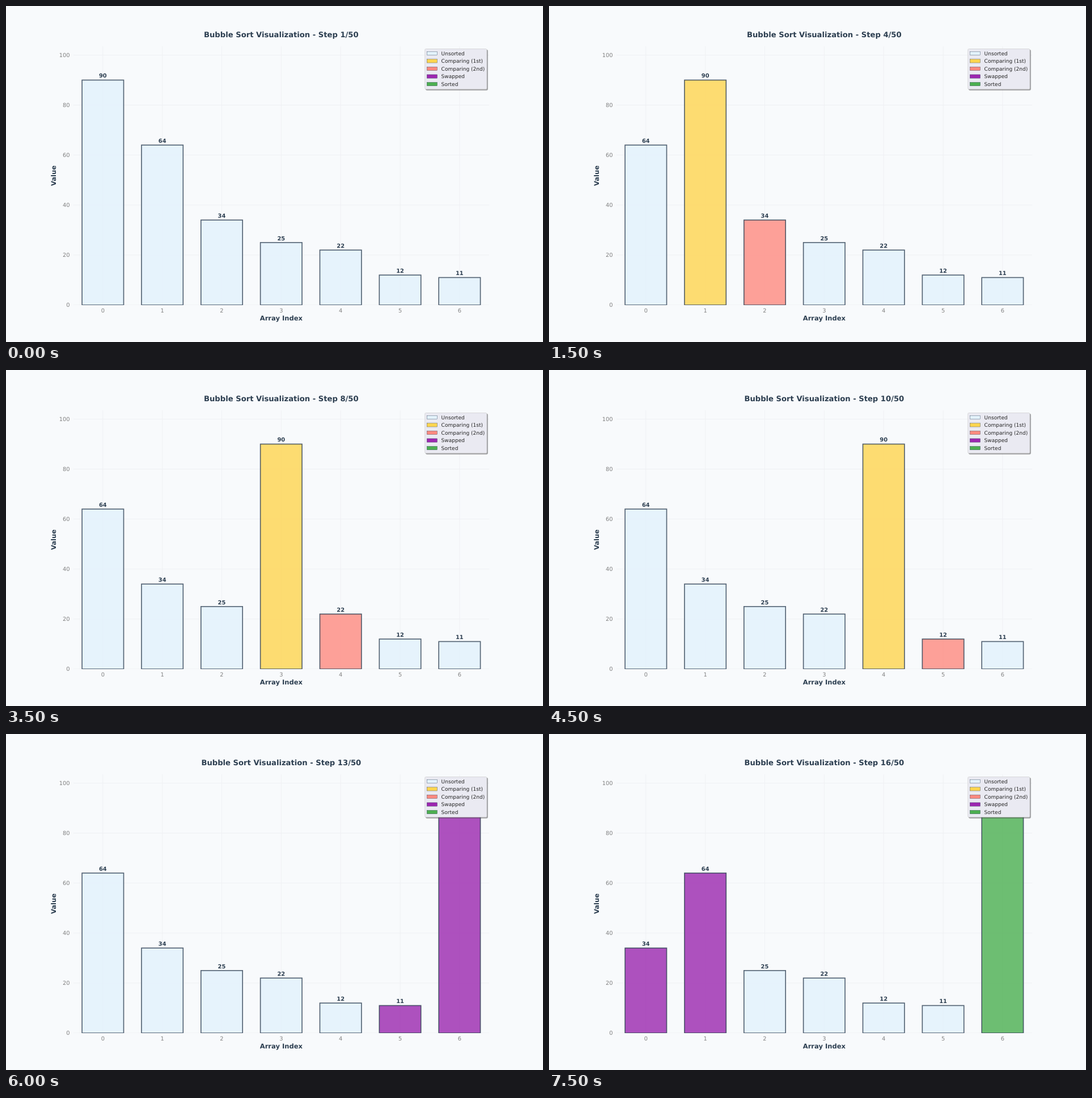
These frames come from a looping animation (947 by 592 pixels, 8 s). An HTML page:

```html
<!DOCTYPE html>
<html lang="en">
<head>
<meta charset="utf-8">
<title>Bubble Sort</title>
<style>
  html, body { margin: 0; width: 100%; height: 100%; overflow: hidden; background: #f8fafc; }
  svg { display: block; width: 947px; height: 592px; }
  text { font-family: "DejaVu Sans", sans-serif; text-rendering: geometricPrecision; text-anchor: middle; }
  .title, .label, .value { font-weight: bold; fill: #2c3e50; }
  .title { font-size: 13.15px; }
  .label { font-size: 11.51px; }
  .value { font-size: 9.866px; }
  .tick { font-size: 9.866px; fill: #808080; }
  .key { font-size: 9.04px; fill: #262626; text-anchor: start; }
  .end { text-anchor: end; }
  .grid { stroke: #eef0f3; stroke-width: .82; }
  .bar { fill-opacity: .8; stroke: #2c3e50; stroke-opacity: .8; stroke-width: 1.64; }
</style>
</head>
<body>
<svg id="stage" viewBox="0 0 947 592">
  <defs><clipPath id="axes"><rect x="118.4" y="71" width="733.9" height="455.9"/></clipPath></defs>
</svg>
<script>
const COLORS = { unsorted: '#e3f2fd', first: '#ffd54f', second: '#ff8a80', swapped: '#9c27b0', sorted: '#4caf50' };
const START = [90, 64, 34, 25, 22, 12, 11];
const STEP_MS = 500, STEPS = 16, TOTAL = 50;
const LEFT = 118.375, RIGHT = 852.3, TOP = 71.04, BASE = 526.88;
const SLOT = (RIGHT - LEFT) / START.length;
const UNIT = (BASE - TOP) / 103.5;
const MID = (LEFT + RIGHT) / 2;

const xOf = i => LEFT + SLOT * (i + .5);
const yOf = v => BASE - UNIT * v;
const stage = document.getElementById('stage');

function add(parent, tag, attrs, content = '') {
  const node = document.createElementNS('http://www.w3.org/2000/svg', tag);
  for (const name in attrs) node.setAttribute(name, attrs[name]);
  node.textContent = content;
  return parent.appendChild(node);
}
const write = (cls, x, y, content) => add(stage, 'text', { class: cls, x, y }, content);

// Record the state of the array at every step of the sort.
function sortSteps() {
  const list = [...START], steps = [];
  let done = list.length;
  const save = (i, a, b) => steps.push({
    values: [...list],
    kinds: list.map((_, k) => k >= done ? 'sorted' : k === i ? a : k === i + 1 ? b : 'unsorted')
  });
  save(-2);
  while (done > 1) {
    for (let i = 0; i < done - 1; i++) {
      save(i, 'first', 'second');
      if (list[i] > list[i + 1]) {
        [list[i], list[i + 1]] = [list[i + 1], list[i]];
        save(i, 'swapped', 'swapped');
      }
    }
    done--;
    save(-2);
  }
  return steps.slice(0, STEPS);
}

const plot = add(stage, 'g', { 'clip-path': 'url(#axes)' });
START.forEach((_, i) => {
  add(plot, 'line', { class: 'grid', x1: xOf(i), x2: xOf(i), y1: TOP, y2: BASE });
  write('tick', xOf(i), 540.4, i);
});
for (let v = 0; v <= 100; v += 20) {
  add(plot, 'line', { class: 'grid', x1: LEFT, x2: RIGHT, y1: yOf(v), y2: yOf(v) });
  write('tick end', 112.6, yOf(v) + 3.6, v);
}

const title = write('title', MID, 54.6, '');
write('label', MID, 554.3, 'Array Index');
add(stage, 'text', { class: 'label', transform: `translate(88.1 ${(TOP + BASE) / 2}) rotate(-90)` }, 'Value');

const bars = START.map((_, i) => ({
  rect: add(plot, 'rect', { class: 'bar', x: xOf(i) - SLOT * .35, width: SLOT * .7 }),
  text: write('value', xOf(i), 0, '')
}));

const box = { x: 738.7, y: 75.6, width: 109.2, height: 71, rx: 1.8 };
add(stage, 'rect', { ...box, x: box.x + 1.64, y: box.y + 1.64, fill: '#464649', stroke: '#464649', 'stroke-width': .82, opacity: .5 });
add(stage, 'rect', { ...box, fill: '#eaeaf2', stroke: '#ccc', 'stroke-opacity': .8, 'stroke-width': .82 });
const NAMES = ['Unsorted', 'Comparing (1st)', 'Comparing (2nd)', 'Swapped', 'Sorted'];
Object.values(COLORS).forEach((fill, i) => {
  const y = 86.5 + 13.56 * i;
  add(stage, 'rect', { x: 742.3, y: y - 6.3, width: 18.1, height: 6.3, fill, stroke: '#2c3e50', 'stroke-width': .4 });
  write('key', 767.6, y, NAMES[i]);
});

const steps = sortSteps();
let shown = -1;

function show(n) {
  if (n === shown) return;
  shown = n;
  title.textContent = `Bubble Sort Visualization - Step ${n + 1}/${TOTAL}`;
  bars.forEach(({ rect, text }, i) => {
    const v = steps[n].values[i];
    rect.setAttribute('y', yOf(v));
    rect.setAttribute('height', UNIT * v);
    rect.setAttribute('fill', COLORS[steps[n].kinds[i]]);
    text.setAttribute('y', yOf(v) - 4.1);
    text.textContent = v;
  });
}

const began = performance.now();
function tick() {
  show(Math.floor((performance.now() - began) / STEP_MS) % STEPS);
  requestAnimationFrame(tick);
}
tick();
</script>
</body>
</html>
```
